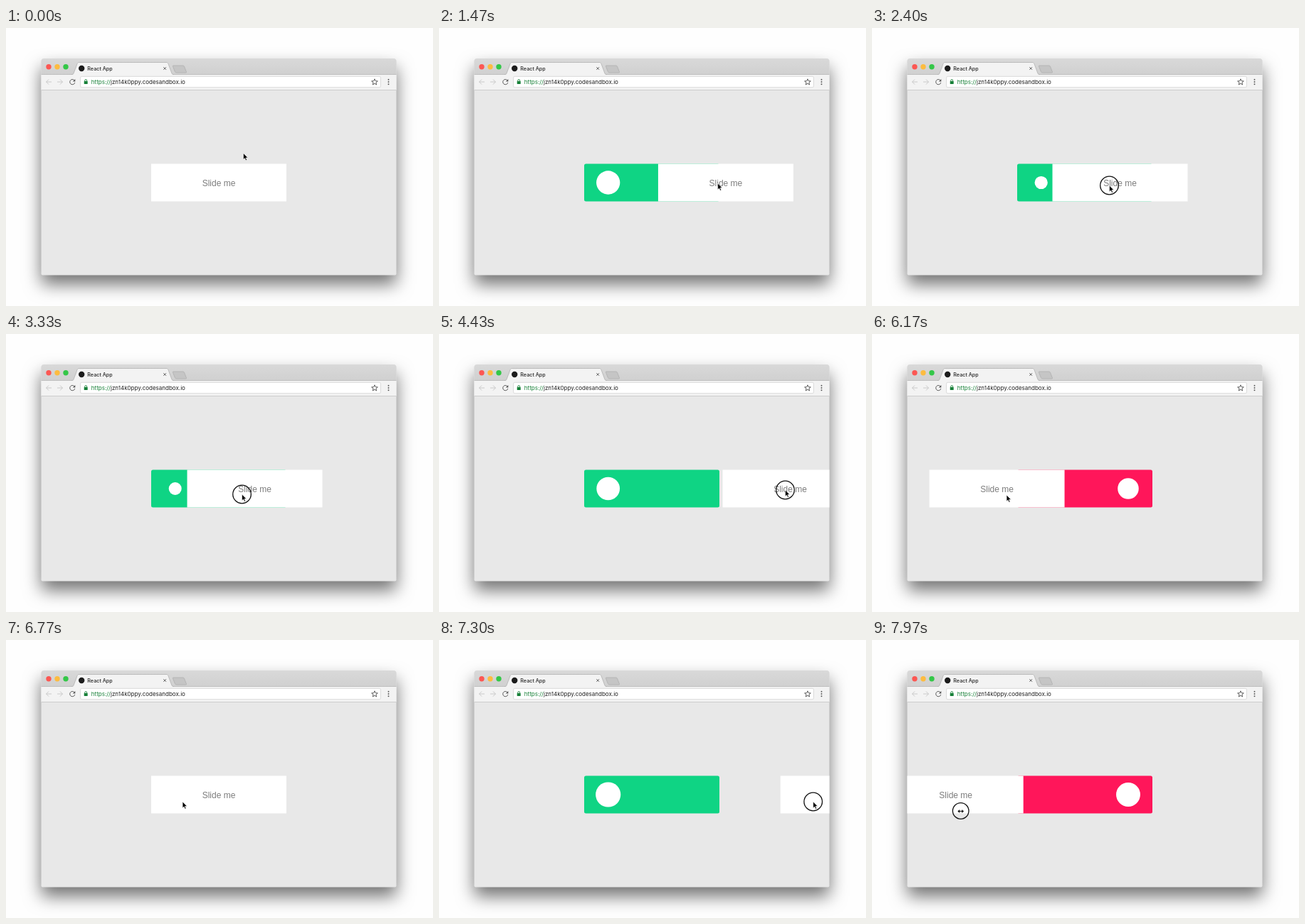
Animation of 600x392 px, one loop 8000 ms. Source, as an HTML page:

```html
<!DOCTYPE html>
<html lang="en">
<head>
<meta charset="utf-8">
<title>Slide me</title>
<style>
  html, body { margin: 0; width: 100%; height: 100%; overflow: hidden; background: #fefefe; }
  svg { display: block; width: 600px; height: 392px; }
  text { font-family: Inter, Roboto, sans-serif; }
  .label { font: 12px "Liberation Sans", Arial, sans-serif; fill: #7c7c7c; text-anchor: middle; }
  .window { filter: drop-shadow(0 13px 12px rgba(0, 0, 0, .55)); }
  .icon { fill: none; stroke: #5c5c5c; stroke-width: 1; }
  .off { stroke: #cacaca; }
</style>
</head>
<body>
<svg viewBox="0 0 600 392">
  <defs>
    <clipPath id="page"><rect x="49.5" y="87.5" width="499" height="261"/></clipPath>
    <linearGradient id="strip" x2="0" y2="1">
      <stop stop-color="#d9d9d9"/><stop offset="1" stop-color="#d0d0d0"/>
    </linearGradient>
  </defs>

  <path class="window" d="M49.5 47a4 4 0 0 1 4-4h491a4 4 0 0 1 4 4v299.500a2 2 0 0 1-2 2h-495a2 2 0 0 1-2-2z" fill="#e8e8e8"/>
  <path d="M49.500 65.500V47a4 4 0 0 1 4-4h491a4 4 0 0 1 4 4v18.500z" fill="url(#strip)"/>
  <rect x="49.500" y="65.500" width="499" height="22" fill="#f3f3f3"/>
  <path d="M49.500 65.500h499" stroke="#b5b5b5" stroke-width=".8"/>
  <path d="M92 66c2 0 2.500-1 3-2l5-13.500c.6-1.500 1.200-2 3-2h122c1.800 0 2.400.5 3 2l5 13.500c.5 1 1 2 3 2z" fill="#f3f3f3"/>
  <path d="M92 65.500c2 0 2.500-.5 3-1.500l5-13.500c.6-1.500 1.200-2 3-2h122c1.800 0 2.400.5 3 2l5 13.500c.5 1 1 1.500 3 1.500" fill="none" stroke="#b2b2b2" stroke-width=".8"/>
  <path d="M235 53h13.500q1.500 0 2 1.300l3 7.700q.3 1-.8 1h-13.200q-1.500 0-2-1.300l-3-7.500q-.4-1.200.5-1.200z" fill="#c5c5c5" stroke="#ababab" stroke-width=".7"/>
  <path d="M49.500 87.500h499" stroke="#c9c9c9" stroke-width=".9"/>

  <circle cx="60" cy="54.700" r="3.700" fill="#fc5753"/>
  <circle cx="72" cy="54.700" r="3.700" fill="#fdbc40"/>
  <circle cx="84" cy="54.700" r="3.700" fill="#34c748"/>
  <circle cx="106.200" cy="57" r="4.200" fill="#1c1c1c"/>
  <text x="114.300" y="59.700" font-size="7.200" font-weight="500" fill="#262626">React App</text>
  <path class="icon" d="M221.400 55.200l3.600 3.600m0-3.600l-3.600 3.600"/>

  <path class="icon off" d="M64 76h-7.500m3.500-3.500l-3.500 3.500 3.500 3.500M72 76h7.500m-3.500-3.500l3.500 3.500-3.500 3.500"/>
  <path class="icon" d="M96 73.700a3.600 3.600 0 1 0 .8 3.300"/>
  <path d="M97.300 72v3.500h-3.500z" fill="#5c5c5c"/>
  <rect x="104.500" y="68.300" width="422" height="15.400" rx="2" fill="#fff" stroke="#d2d2d2" stroke-width=".8"/>
  <rect x="109.700" y="75" width="5" height="4" rx=".5" fill="#178038"/>
  <path d="M110.800 75.500v-1.500a1.400 1.400 0 0 1 2.800 0v1.500" fill="none" stroke="#178038" stroke-width=".9"/>
  <text x="119.800" y="78.900" font-size="8" fill="#1f1f1f"><tspan fill="#178038">https://</tspan>jzn14k0ppy.codesandbox.io</text>
  <path class="icon" stroke-width=".8" d="M518 71.800l1.200 2.900 3.100.2-2.400 2 .8 3.100-2.700-1.700-2.700 1.700.8-3.100-2.400-2 3.100-.2z"/>
  <g fill="#555"><circle cx="537.500" cy="72.700" r=".95"/><circle cx="537.500" cy="76" r=".95"/><circle cx="537.500" cy="79.300" r=".95"/></g>

  <g clip-path="url(#page)">
    <g id="panel">
      <rect id="back" x="204" y="191.500" width="190" height="53" rx="2.500"/>
      <circle id="bubble" cy="218" fill="#fff"/>
    </g>
    <g id="item">
      <rect x="204" y="191.500" width="190" height="53" fill="#fff"/>
      <text class="label" x="299" y="223.300">Slide me</text>
    </g>
  </g>

  <g id="cursor">
    <circle id="ring" fill="none" stroke="#111" stroke-width="1.300"/>
    <path id="arrow" d="M0 0v9l2-1.900 1.500 3.200 1.500-.7-1.500-3.100h2.800z" fill="#000" stroke="#fff" stroke-width=".6"/>
    <path id="resize" d="M-4.500 .5l3-2.700v2h3v-2l3 2.700-3 2.700v-2h-3v2z" fill="#000" stroke="#fff" stroke-width=".4"/>
  </g>
</svg>
<script>
const LOOP = 8000;
const OMEGA = 0.017;
const THRESHOLD = 45;

// down/up: press and release time, pull: time to reach the peak, grab/y: pointer position
const stroke = (down, pull, up, peak, grab, y) => ({ down, pull, up, peak, grab, y });
const strokes = [
  stroke(1000, 440, 1447, 111, 281, 219),
  stroke(2180, 390, 2570, 82, 284, 222),
  stroke(3180, 371, 3560, 142, 281, 226),
  stroke(4110, 450, 4800, 240, 292, 220),
  stroke(5400, 420, 6100, -187, 374.5, 227),
  stroke(6850, 460, 7310, 276, 250, 228),
  stroke(7600, 430, 8100, -190, 306, 241)
];

const $ = id => document.getElementById(id);
const [panel, back, bubble, item, cursor, ring, arrow, resize] =
  ["panel", "back", "bubble", "item", "cursor", "ring", "arrow", "resize"].map($);
const clamp = v => Math.min(1, Math.max(0, v));
const mix = (a, b, p) => a + (b - a) * p;
const smooth = p => p * p * (3 - 2 * p);
const swing = p => (1 - Math.cos(Math.PI * clamp(p))) / 2;
// Remaining distance of a critically damped spring
const spring = t => t <= 0 ? 1 : (1 + OMEGA * t) * Math.exp(-OMEGA * t);
const show = (el, on) => el.setAttribute("display", on ? "inline" : "none");

function dragAt(s, t) {
  return s.peak * swing((t - s.down) / s.pull) * spring(t - s.up);
}

function bubbleScale(s, t) {
  const cross = s.down + s.pull * Math.acos(1 - 2 * THRESHOLD / Math.abs(s.peak)) / Math.PI;
  const grown = 1 - spring(Math.min(t, s.up) - cross);
  return 0.5 + 0.5 * grown * spring(t - s.up);
}

function pointerAt(last, next, t) {
  if (last && t < last.up) return [last.grab + dragAt(last, t), last.y];
  const from = last ? [last.grab + last.peak, last.y, last.up] : [333.5, 176.500, 0];
  const p = smooth(clamp((t - from[2]) / (next.down - from[2])));
  return [mix(from[0], next.grab, p), mix(from[1], next.y, p)];
}

function render(t) {
  const n = strokes.filter(s => s.down <= t).length;
  const last = strokes[n - 1];
  const x = last ? dragAt(last, t) : 0;
  const right = x > 0;

  item.setAttribute("transform", `translate(${x.toFixed(2)} 0)`);
  show(panel, Math.abs(x) > 0.3);
  back.setAttribute("fill", right ? "#0fd484" : "#ff165a");
  bubble.setAttribute("cx", right ? 237.7 : 360);
  bubble.setAttribute("r", last ? 17.8 * bubbleScale(last, t) : 8.9);

  const [px, py] = pointerAt(last, strokes[n], t);
  const sizing = t > 7850;
  cursor.setAttribute("transform", `translate(${px.toFixed(2)} ${py.toFixed(2)})`);
  ring.setAttribute("r", sizing ? 11.3 : 12.8);
  show(ring, last && t < last.up);
  show(arrow, !sizing);
  show(resize, sizing);
}

const start = performance.now();
function tick() {
  render((performance.now() - start) % LOOP);
  requestAnimationFrame(tick);
}
tick();
</script>
</body>
</html>
```
